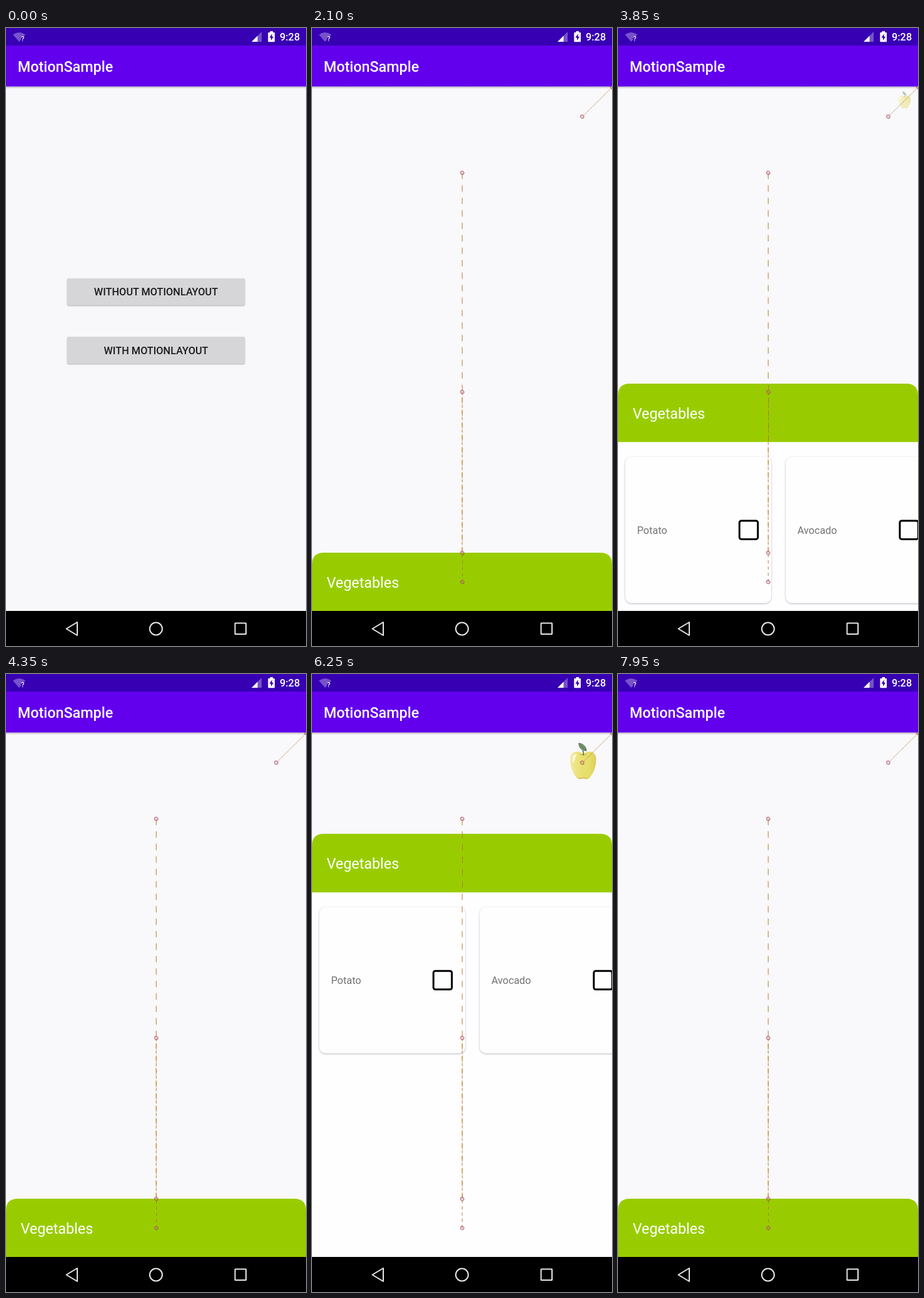
An HTML page that plays this animation: 480 px wide and 987 px high, repeating every 8000 ms.

```html
<!DOCTYPE html>
<html lang="en">
<head>
<meta charset="utf-8">
<title>MotionSample</title>
<style>
  html, body { margin: 0; width: 100%; height: 100%; overflow: hidden; background: #000; }
  svg { display: block; width: 100%; height: 100%; }
  text { font-family: Roboto, "Noto Sans", sans-serif; font-size: 16.35px; }
  .big { font-size: 23.36px; fill: #fff; }
  .medium { font-weight: 500; }
  .button { fill: #1c1b1e; text-anchor: middle; }
  .label { fill: #737373; }
  .card { fill: #fffeff; filter: drop-shadow(0 1.6px 1.8px rgba(0, 0, 0, .27)); }
  .raised { fill: #d6d5d8; filter: drop-shadow(0 1.2px 1px rgba(0, 0, 0, .3)); }
  .nav { fill: none; stroke: #e6e6e6; stroke-width: 2; stroke-linejoin: round; }
  .guides, .guides * { fill: none; stroke-width: .9; }
</style>
</head>
<body>
<svg viewBox="0 0 480 987" preserveAspectRatio="none">
  <defs>
    <linearGradient id="shade" x1="0" y1="0" x2="0" y2="1">
      <stop offset="0" stop-opacity=".32"/>
      <stop offset=".4" stop-opacity=".12"/>
      <stop offset="1" stop-opacity="0"/>
    </linearGradient>
    <linearGradient id="skin">
      <stop offset="0" stop-color="#f1eb9c"/>
      <stop offset=".3" stop-color="#ebe274"/>
      <stop offset=".75" stop-color="#e6dc62"/>
      <stop offset="1" stop-color="#d9cb55"/>
    </linearGradient>
    <clipPath id="content"><rect y="93.4" width="480" height="837.6"/></clipPath>
  </defs>

  <rect width="480" height="987" fill="#f8f7fa"/>
  <g id="home"></g>

  <g clip-path="url(#content)">
    <g id="page">
      <rect y="93" width="480" height="900" fill="#f9f8fa"/>
      <g id="apple">
        <path d="M0-12C6-18 20-19 21.5-5C22.5 10 14 27 8 29C4 30 3 28 0 28C-3 28-4 30-8 29C-14 27-22.5 10-21.5-5C-20-19-6-18 0-12Z" fill="url(#skin)"/>
        <path d="M-11 25C-7 30-4 27 0 27C4 27 7 30 11 25C7 32 4 28.500 0 28.500C-4 28.500-7 32-11 25Z" fill="#c9b54a"/>
        <path d="M-18-6C-17-12-12-13-10-11C-13-7-14-2-16 3C-18 1-18.500-3-18-6Z" fill="#faf7d4"/>
        <path d="M-7-11.500C-3-9 3-9 7-11.500C3-13 2-12 0-11C-2-12-3-13-7-11.500Z" fill="#c9c052"/>
        <path d="M0-10C.8-13 .5-16-1-18" fill="none" stroke="#4d5a3c" stroke-width="1.6"/>
        <path d="M-7.500-30C-1-30 5-25 5.500-17.500C-1-17-7-21-7.500-30Z" fill="#719268" stroke="#45684d" stroke-width=".8"/>
        <path d="M-6-28L5-18" stroke="#3f6046" stroke-width=".9"/>
      </g>
      <g id="sheet"></g>
      <g id="guides" class="guides"></g>
    </g>
  </g>

  <rect y="93.4" width="480" height="4" fill="url(#shade)"/>
  <rect width="480" height="93.4" fill="#6200ee"/>
  <rect width="480" height="28" fill="#3700b3"/>
  <text x="18.700" y="69.800" class="big medium">MotionSample</text>

  <g fill="#fff">
    <path d="M11 10.500Q21 3.500 31 10.500L28.500 13.500H24V18.500L21 22Z" opacity=".32"/>
    <text x="24" y="21" class="medium" style="font-size:11px">?</text>
    <path d="M393 22L409 6V22Z" opacity=".32"/>
    <path d="M393 22L402.500 12.500V22Z"/>
    <path d="M422.500 5H427V7H429Q430 7 430 8V21Q430 22.300 429 22.300H420.500Q419.300 22.300 419.300 21V8Q419.300 7 420.500 7H422.500Z"/>
    <path d="M425.600 9.300L421.400 15.500H424V20L428 13.700H425.600Z" fill="#3700b3"/>
    <text x="438" y="20.300" class="medium">9:28</text>
  </g>

  <rect y="931" width="480" height="56" fill="#000"/>
  <g class="nav">
    <path d="M96.500 959.500L114 949V970Z"/>
    <circle cx="240" cy="959.500" r="10"/>
    <rect x="366.500" y="950.500" width="17.500" height="17.500" rx=".5"/>
  </g>
</svg>

<script>
const el = id => document.getElementById(id);
const LOOP = 8000, STEP = 50;
const CLOSED = 838, OPEN = 231;
const CORNER = { x: 480, y: 94 }, FRUIT = { x: 432, y: 141.3 };

// [time, sheet openness]
const SWIPES = [
  [2450, 0], [2500, .22], [2550, .58], [2600, .81], [2650, .919], [2900, 1],
  [3400, 1], [3850, .445], [4300, 0],
  [5150, 0], [5500, .41], [6250, .96], [6750, 1],
  [7150, 1], [7500, .52], [7900, 0]
];
const PAGE_IN = { start: 850, length: 350 };

const button = (y, label) =>
  `<rect class="raised" x="98" y="${y}" width="284" height="42.800" rx="2"/>
   <text class="button medium" x="240" y="${y + 27.2}">${label}</text>`;

const card = (x, name) =>
  `<rect class="card" x="${x}" y="117" width="233.500" height="233.500" rx="10"/>
   <text class="label" x="${x + 18.7}" y="240">${name}</text>
   <rect x="${x + 182.6}" y="219" width="29.500" height="29.500" rx="3" fill="none" stroke="#000" stroke-width="3"/>`;

// A path is drawn as 61 equal pieces, every other one visible.
function guide(a, b) {
  const dash = Math.hypot(b.x - a.x, b.y - a.y) / 61;
  return `<path d="M${a.x} ${a.y}L${b.x} ${b.y}" stroke-dasharray="${dash}"/>`;
}
const ring = p => `<circle cx="${p.x}" cy="${p.y}" r="2.700"/>`;

function buildGuides() {
  const mid = y => ({ x: 240, y });
  const pairs = [[mid(OPEN), mid(CLOSED)], [mid(581), mid(884.5)], [FRUIT, CORNER]];
  const lines = pairs.map(p => guide(...p)).join("");
  const rings = pairs.flat().map(ring).join("");
  return `<g stroke="#000" stroke-opacity=".47" transform="translate(.6 .6)">${lines}${rings}</g>
          <g stroke="#ffaa33" stroke-opacity=".8">${lines}</g>
          <g stroke="#d9688c">${rings}</g>`;
}

el("home").innerHTML = button(400, "WITHOUT MOTIONLAYOUT") + button(493.3, "WITH MOTIONLAYOUT");
el("sheet").innerHTML =
  `<rect y="93" width="480" height="700" fill="#fefdff"/>
   <path d="M0 93.400V18.700Q0 0 18.700 0H461.300Q480 0 480 18.700V93.400Z" fill="#99cc00"/>
   <text x="23.400" y="55.700" class="big">Vegetables</text>` +
  card(11.7, "Potato") + card(268.3, "Avocado");
el("guides").innerHTML = buildGuides();

const clamp = v => Math.min(1, Math.max(0, v));

function slope(i) {
  const rate = k => (SWIPES[k + 1][1] - SWIPES[k][1]) / (SWIPES[k + 1][0] - SWIPES[k][0]);
  if (i === 0 || i === SWIPES.length - 1) return 0;
  const a = rate(i - 1), b = rate(i);
  return a * b > 0 ? 2 * a * b / (a + b) : 0;
}

// Smooth curve through the swipe points that never overshoots.
function openness(t) {
  const i = SWIPES.findIndex(s => s[0] > t);
  if (i <= 0) return 0;
  const [t0, a] = SWIPES[i - 1], [t1, b] = SWIPES[i];
  const d = t1 - t0, u = (t - t0) / d, v = 1 - u;
  return a * v * v * (1 + 2 * u) + b * u * u * (3 - 2 * u)
    + d * u * v * (v * slope(i - 1) - u * slope(i));
}

function draw(t) {
  const p = openness(t);
  const enter = clamp((t - PAGE_IN.start) / PAGE_IN.length);
  const rise = 70 * (1 - enter) ** 3;
  el("page").setAttribute("opacity", enter);
  el("page").setAttribute("transform", `translate(0 ${rise})`);
  el("sheet").setAttribute("transform", `translate(0 ${CLOSED + (OPEN - CLOSED) * p})`);
  const x = CORNER.x + (FRUIT.x - CORNER.x) * p;
  const y = CORNER.y + (FRUIT.y - CORNER.y) * p;
  el("apple").setAttribute("transform", `translate(${x} ${y}) scale(${p})`);
  el("apple").setAttribute("opacity", p);
}

const start = performance.now();
function tick() {
  const t = (performance.now() - start) % LOOP;
  draw(Math.floor(t / STEP) * STEP);
  requestAnimationFrame(tick);
}
tick();
</script>
</body>
</html>
```
